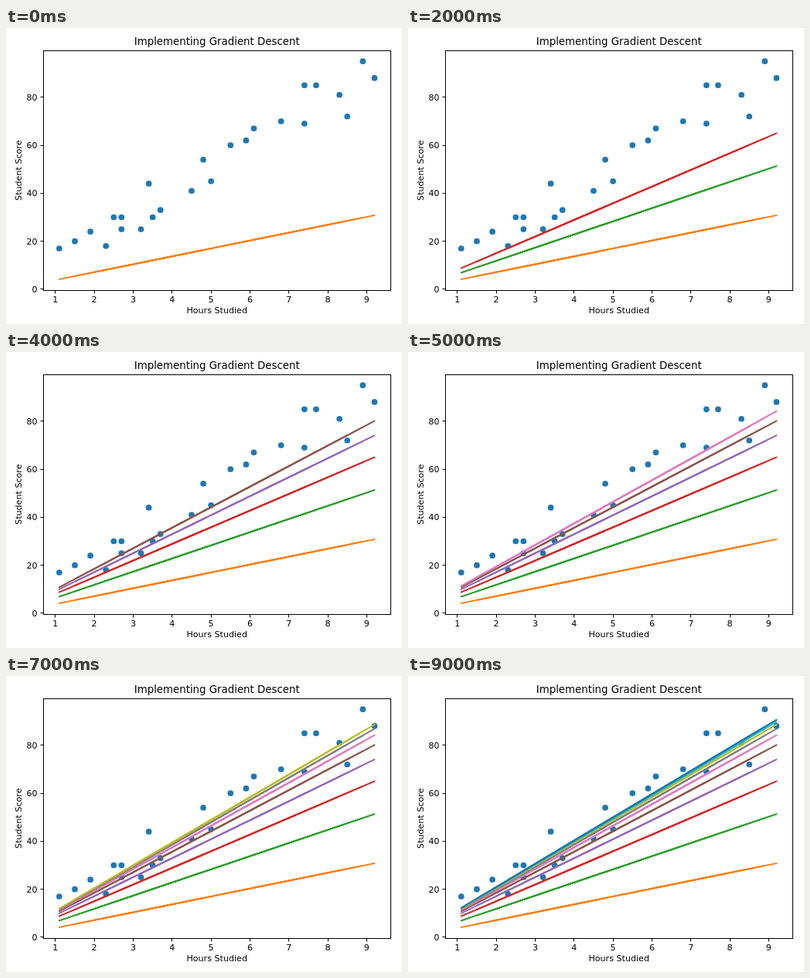
These frames come from a looping animation (512 by 384 pixels, 10000 ms). An HTML page:

```html
<!DOCTYPE html>
<html lang="en">
<head>
<meta charset="utf-8">
<title>Implementing Gradient Descent</title>
<style>
  html, body { margin: 0; width: 100%; height: 100%; overflow: hidden; background: #fff; }
  svg { display: block; width: 512px; height: 384px; }
  text { font: 11.11px "DejaVu Sans", sans-serif; text-anchor: middle; }
  .title { font-size: 13.33px; }
  .end { text-anchor: end; }
  .axis { stroke: #000; stroke-width: 1; fill: none; }
  .fit { stroke-width: 1.67; stroke-linecap: round; }
</style>
</head>
<body>
<svg id="chart" viewBox="0 0 512 384"></svg>
<script>
const points = [
  [2.3, 18], [5, 45], [3.2, 25], [8.5, 72], [3.5, 30], [1.5, 20], [9.2, 88],
  [5.5, 60], [8.3, 81], [2.7, 25], [7.7, 85], [5.9, 62], [4.5, 41], [3.4, 44],
  [1.1, 17], [8.9, 95], [2.5, 30], [1.9, 24], [6.1, 67], [7.4, 69], [2.7, 30],
  [4.8, 54], [3.7, 33], [6.8, 70], [7.4, 85]
];
const colors = ["#ff7f0e", "#2ca02c", "#d62728", "#9467bd", "#8c564b",
                "#e377c2", "#7f7f7f", "#bcbd22", "#17becf", "#1f77b4"];
const learningRate = 0.01055;
const stepMs = 1000;

const chart = document.getElementById("chart");
const px = hours => 13.5 + 50.32 * hours;
const py = score => 338.9 - 3.113 * score;
const snap = v => Math.floor(v) + 0.5;

function add(tag, attributes, parent = chart, content = "") {
  const node = document.createElementNS(chart.namespaceURI, tag);
  for (const [name, value] of Object.entries(attributes)) node.setAttribute(name, value);
  node.textContent = content;
  return parent.appendChild(node);
}
const label = (content, x, y, extra = {}) => add("text", { x, y, ...extra }, chart, content);

for (const [x, y] of points) add("circle", { cx: px(x), cy: py(y), r: 3.85, fill: "#1f77b4" });

// One descent step per line; segments follow the unsorted data and overlap.
let slope = 0, intercept = 0;
const fits = colors.map(stroke => {
  let slopeStep = 0, interceptStep = 0;
  for (const [x, y] of points) {
    const error = y - (slope * x + intercept);
    slopeStep += error * x / points.length;
    interceptStep += error / points.length;
  }
  slope += learningRate * slopeStep;
  intercept += learningRate * interceptStep;

  const group = add("g", { class: "fit", stroke });
  const predict = x => py(slope * x + intercept);
  for (let i = 1; i < points.length; i++) {
    const from = points[i - 1][0], to = points[i][0];
    add("line", { x1: px(from), y1: predict(from), x2: px(to), y2: predict(to) }, group);
  }
  return group;
});

add("rect", { class: "axis", x: 48.5, y: 29.5, width: 449, height: 311 });
for (let hours = 1; hours <= 9; hours++) {
  add("path", { class: "axis", d: `M${snap(px(hours))} 340.5v4` });
  label(hours, px(hours), 356);
}
for (let score = 0; score <= 80; score += 20) {
  add("path", { class: "axis", d: `M48.5 ${snap(py(score))}h-4` });
  label(score, 40.7, Math.round(py(score) + 4), { class: "end" });
}
label("Implementing Gradient Descent", 272.7, 22, { class: "title" });
label("Hours Studied", 272.7, 370);
label("Student Score", 0, 0, { transform: "translate(20 184.7) rotate(-90)" });

function render(now) {
  const shown = Math.floor(now / stepMs) % fits.length;
  fits.forEach((fit, i) => fit.setAttribute("visibility", i <= shown ? "visible" : "hidden"));
}
const start = performance.now();
function tick() {
  render(performance.now() - start);
  requestAnimationFrame(tick);
}
tick();
</script>
</body>
</html>
```
